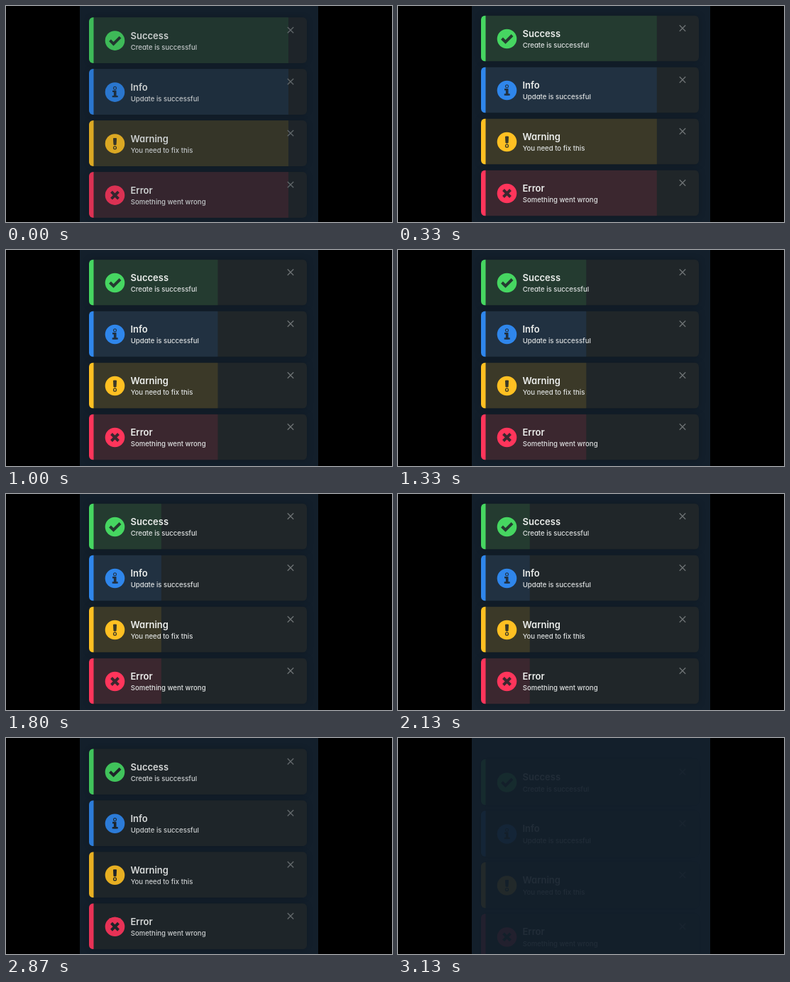
Animation of 544 by 306 pixels, one loop 3.87 s. Source, as an HTML page:

```html
<!DOCTYPE html>
<html>
<head>
<meta charset="utf-8">
<style>
html, body { margin: 0; width: 100%; height: 100%; overflow: hidden; background: #000; }
svg { display: block; width: 544px; height: 306px; font-family: Inter, sans-serif; font-feature-settings: "cv11"; }
.title { font-size: 13px; font-weight: 600; fill: #eceeec; }
.note { font-size: 9.6px; font-weight: 500; fill: #dfe2e2; }
.card { filter: drop-shadow(0 0 5px rgba(0, 0, 0, .2)); }
.glyph { fill: none; stroke: #000; stroke-width: 4; }
.close { stroke: #6c7173; stroke-width: 1.4; }
</style>
</head>
<body>
<svg viewBox="0 0 544 306">
  <defs><clipPath id="round"><rect x="117" width="307" height="65" rx="6"/></clipPath></defs>
  <rect x="104" width="336" height="306" fill="#131f2b"/>
  <g id="stack"></g>
</svg>
<script>
const LOOP = 3870, FPS = 15, HOLD = 3134;
const ENTER = -250, LEAVE = 2820, FADE = 450;
const LEFT = 117, DROP = 17.5;

// Glyphs are centred on the icon's origin.
const toasts = [
  ['Success', 'Create is successful', '#46d661',
    '<path d="M-7-.5L-2 4.5L7.5-5"/>'],
  ['Info', 'Update is successful', '#2f86eb',
    '<circle cy="-5.8" r=".5"/><path stroke-width="2.4" d="M-3.5-1.2H1.2M-3.8 6H4.2"/><path stroke-width="3.6" d="M.2-2.4V7"/>'],
  ['Warning', 'You need to fix this', '#ffc022',
    '<path fill="#000" stroke-width="1" d="M-2-7.5H2L1.5 1.5H-1.5Z"/><circle cy="5.7" r=".6"/>'],
  ['Error', 'Something went wrong', '#ff355b',
    '<path d="M-5-5L5 5M5-5L-5 5"/>']
];

const stack = document.getElementById('stack');
stack.innerHTML = toasts.map(([title, note, color, glyph], i) => `
  <g transform="translate(0 ${13.5 + 73 * i})">
    <g class="card"><g clip-path="url(#round)">
      <rect x="${LEFT}" width="307" height="65" fill="#202629"/>
      <rect class="bar" x="${LEFT}" height="65" fill="${color}" opacity=".12"/>
      <rect x="${LEFT}" width="6.5" height="65" fill="${color}"/>
    </g></g>
    <mask id="m${i}" maskUnits="userSpaceOnUse" x="-15" y="-15" width="30" height="30">
      <rect x="-15" y="-15" width="30" height="30" fill="#fff"/>
      <g class="glyph">${glyph}</g>
    </mask>
    <g transform="translate(153.5 33)"><circle r="13.8" fill="${color}" mask="url(#m${i})"/></g>
    <text class="title" x="175.5" y="30.5">${title}</text>
    <text class="note" x="175.7" y="45.7">${note}</text>
    <path class="close" d="M396.8 13.8l8.4 8.4m0-8.4l-8.4 8.4"/>
  </g>`).join('');
const bars = document.querySelectorAll('.bar');

// The CSS "ease" curve, solved by bisection.
function ease(x) {
  if (x <= 0) return 0;
  if (x >= 1) return 1;
  let lo = 0, hi = 1, s;
  for (let i = 0; i < 20; i++) {
    s = (lo + hi) / 2;
    if (.75 * s * (1 - s) + s ** 3 < x) lo = s; else hi = s;
  }
  return .3 * s * (1 - s) ** 2 + 3 * s * s * (1 - s) + s ** 3;
}

function draw(now) {
  const step = Math.floor((now % LOOP) * FPS / 1000 + .1);
  const t = Math.min(step * 1000 / FPS, HOLD);
  const shown = ease((t - ENTER) / FADE) - ease((t - LEAVE) / FADE);
  stack.setAttribute('transform', `translate(0 ${DROP * (1 - shown)})`);
  for (const card of stack.children) card.setAttribute('opacity', shown);
  const width = Math.max(0, 398 - .0995 * t - LEFT);
  for (const bar of bars) bar.setAttribute('width', width);
  requestAnimationFrame(draw);
}
const start = performance.now();
(function tick() {
  draw(0);
})();
</script>
</body>
</html>
```
